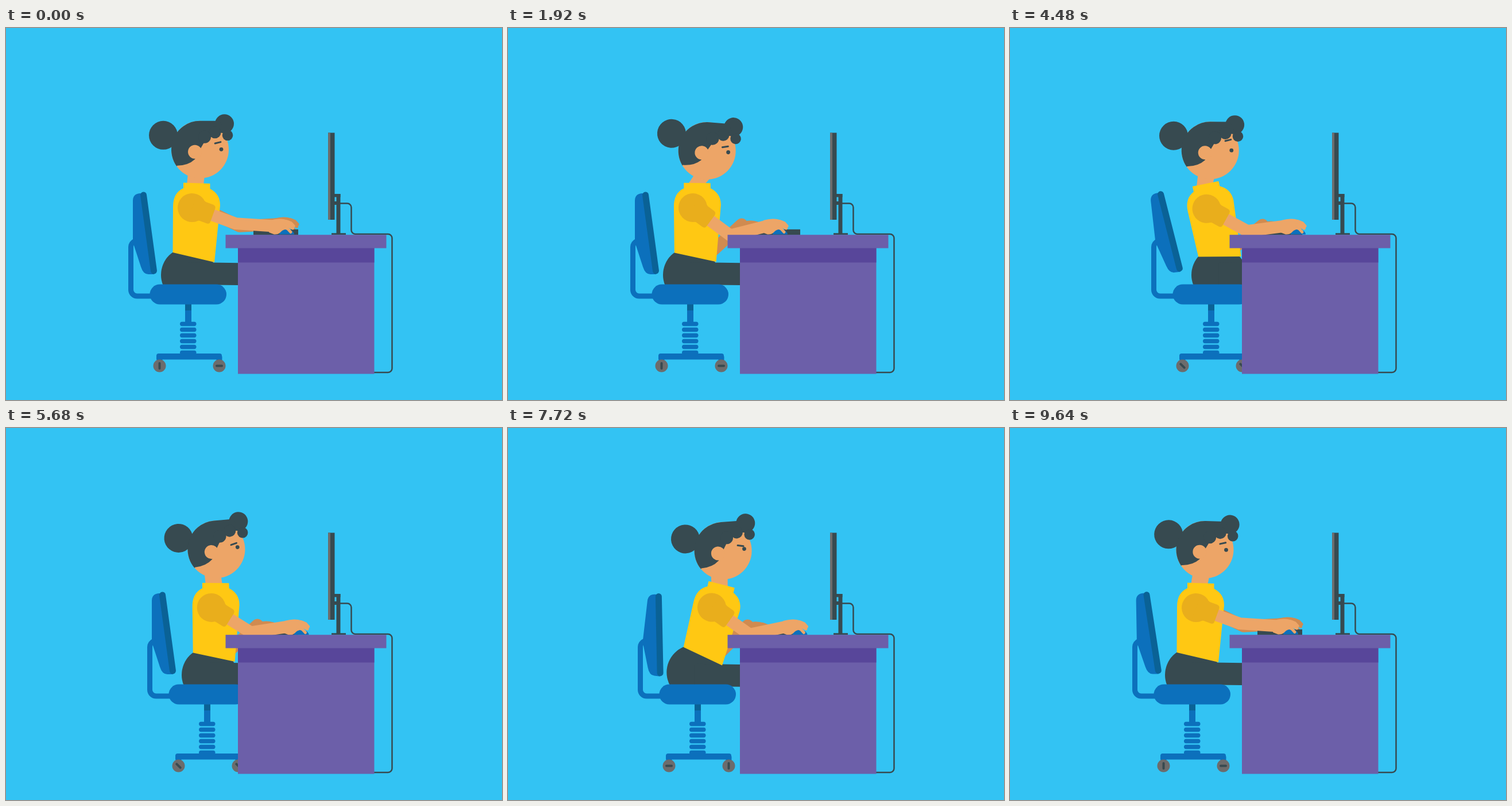
An HTML page with a canvas that plays this animation: 864x648 px, repeating every 9680 ms.

```html
<!DOCTYPE html>
<html lang="en">
<head>
<meta charset="utf-8">
<title>At the desk</title>
<style>
html, body { margin: 0; width: 100%; height: 100%; overflow: hidden; background: #33c3f3; }
canvas { display: block; }
</style>
</head>
<body>
<canvas id="stage" width="864" height="648"></canvas>
<script>
const ctx = document.getElementById('stage').getContext('2d');
const LOOP = 9680;
const RAD = Math.PI / 180;
const C = {
  sky: '#33c3f3', dark: '#374a50', grey: '#6c6c6c', skin: '#eda567', farSkin: '#d08b50',
  shirt: '#ffc813', sleeve: '#e9ae1c', blue: '#0c70bc', navy: '#0a6296',
  desk: '#6c5fa9', drawer: '#58469a'
};

// Poses: each one names only what differs from the pose it grows out of.
const reach = {
  chair: 0, spin: 0, recline: 0, hip: [318, 430], lean: 0,
  neck: 6, tilt: 0, bounce: 0, brow: [-12, -14],
  hand: [466, 345], farHand: [473, 342]
};
const type = { ...reach, lean: -1, neck: 17.5, tilt: 4.7, brow: [-9.6, -13],
  hand: [451, 345], farHand: [411, 348] };
const slump = { ...type, recline: -12.5, lean: -25, neck: 14.5, hand: [414, 345], farHand: [404, 352] };
const scoot = { ...slump, chair: 33, spin: 45, recline: -6.5, hip: [364, 430], lean: -13.5,
  neck: 8.5, tilt: 0.5, brow: [-18, -14], hand: [479, 345], farHand: [444, 349] };
const focus = { ...scoot, recline: 0, hip: [354, 430], lean: -0.7, neck: 1, tilt: -5,
  brow: [-6.6, -15], hand: [491, 346], farHand: [442, 349] };
const rollBack = { ...focus, chair: 13, spin: 90, hip: [334, 430],
  hand: [474, 346], farHand: [424, 349] };
const glare = { ...rollBack, recline: 7.5, hip: [323, 425], lean: 14, neck: 3, tilt: -4,
  brow: [-6.3, 15], hand: [487, 346], farHand: [421, 350] };
const raise = { ...glare, bounce: 3, hand: [486, 274] };
const slam = { ...glare, neck: 9, tilt: 1, hand: [490, 346] };
const settle = { ...reach, recline: -1, neck: 7.5, tilt: 1.5 };

// When each pose is reached; the same pose twice is a hold.
const timeline = [
  [0, reach], [1.2, reach], [1.92, type], [2.15, type], [2.85, slump], [4.14, slump],
  [4.48, scoot], [4.9, focus], [6.8, focus], [7.08, rollBack], [7.9, glare], [8.08, glare],
  [8.36, raise], [8.54, raise], [8.66, slam], [9.05, slam], [9.45, settle], [9.64, settle],
  [9.68, reach]
];
const SLAM_TIME = 8.65;

const clamp = v => Math.max(0, Math.min(1, v));
const ease = p => p * p * (3 - 2 * p);
const add = (a, b) => [a[0] + b[0], a[1] + b[1]];
const mix = (a, b, p) => Array.isArray(a) ? a.map((v, i) => mix(v, b[i], p)) : a + (b - a) * p;

function poseAt(t) {
  const next = Math.max(1, timeline.findIndex(([time]) => time > t));
  const [t0, from] = timeline[next - 1], [t1, to] = timeline[next];
  const p = (t - t0) / (t1 - t0);
  const pose = {};
  for (const key in from) pose[key] = mix(from[key], to[key], ease(p));
  // Long holds keep breathing a little
  if (from === to && t1 - t0 > 0.9) {
    const sway = Math.sin(2 * Math.PI * p) ** 2;
    pose.neck += 2 * sway;
    pose.lean -= 1.5 * sway;
    pose.hand = add(pose.hand, [2 * sway, 0]);
  }
  return pose;
}

function rotate([x, y], deg) {
  const c = Math.cos(deg * RAD), s = Math.sin(deg * RAD);
  return [x * c - y * s, x * s + y * c];
}

function rect(color, x, y, w, h, r = 0) {
  ctx.fillStyle = color;
  ctx.beginPath();
  ctx.roundRect(x, y, w, h, r);
  ctx.fill();
}
function disc(color, x, y, r) {
  ctx.fillStyle = color;
  ctx.beginPath();
  ctx.arc(x, y, r, 0, 7);
  ctx.fill();
}
function poly(color, points) {
  ctx.fillStyle = color;
  ctx.beginPath();
  points.forEach(p => ctx.lineTo(...p));
  ctx.fill();
}
function line(color, width, points) {
  ctx.strokeStyle = color;
  ctx.lineWidth = width;
  ctx.lineCap = ctx.lineJoin = 'round';
  ctx.beginPath();
  points.forEach(p => ctx.lineTo(...p));
  ctx.stroke();
}
// Polyline with rounded corners
function pipe(color, width, points, r) {
  ctx.strokeStyle = color;
  ctx.lineWidth = width;
  ctx.lineCap = 'butt';
  ctx.beginPath();
  ctx.moveTo(...points[0]);
  for (let i = 1; i < points.length - 1; i++) ctx.arcTo(...points[i], ...points[i + 1], r);
  ctx.lineTo(...points[points.length - 1]);
  ctx.stroke();
}
function shape(color, d) {
  ctx.fillStyle = color;
  ctx.fill(new Path2D(d));
}
function at([x, y], deg, draw) {
  ctx.save();
  ctx.translate(x, y);
  ctx.rotate(deg * RAD);
  draw();
  ctx.restore();
}

function chairBack(x, recline) {
  at([x + 223, 378], recline, () => {
    ctx.translate(-223, -378);
    shape(C.blue, 'M240 288H233Q221 289 221 301V373L235 416Q239 429 248 429H258Z');
    line(C.navy, 11, [[239.5, 291], [257.5, 423]]);
  });
  pipe(C.blue, 9, [[x + 228, 370], [x + 217.5, 374], [x + 217.5, 467], [x + 260, 467]], 11);
}

function chairBase(x, spin) {
  at([x, 0], 0, () => {
    rect(C.blue, 312, 490, 11, 24);
    rect(C.navy, 312, 480, 11, 12);
    for (let i = 0; i < 6; i++) rect(C.blue, 303, 511.8 + i * 10, 28.5, 7.4, 3.7);
    rect(C.blue, 262, 567, 114, 10.5, [4, 4, 0, 0]);
    [[267.5, 90 - spin], [371.5, spin]].forEach(([wheelX, deg]) => {
      rect(C.blue, wheelX - 5, 572, 10, 10);
      at([wheelX, 588.5], deg, () => {
        disc(C.grey, 0, 0, 11);
        line(C.dark, 4, [[-4.5, 0], [4.5, 0]]);
      });
    });
    rect(C.blue, 250.5, 446.5, 133.5, 35, 17.5);
  });
}

// Two-bone arm: finds the elbow and the wrist for a given hand
function solveArm(shoulder, hand) {
  const upper = 81, fore = 66;
  const reachLength = Math.hypot(hand[0] - shoulder[0], hand[1] - shoulder[1]);
  const bend = Math.max(clamp((130 - reachLength) / 20), clamp((345 - hand[1]) / 72));
  const wrist = add(hand, [-4 * bend, -6 * bend]);
  const dx = wrist[0] - shoulder[0], dy = wrist[1] - shoulder[1];
  const d = Math.min(Math.hypot(dx, dy), upper + fore - 0.1);
  const inner = Math.acos((upper * upper + d * d - fore * fore) / (2 * upper * d));
  const angle = (Math.atan2(dy, dx) + inner) / RAD;
  return { elbow: add(shoulder, rotate([upper, 0], angle)), wrist, angle };
}

function drawArm(color, shoulder, hand) {
  const arm = solveArm(shoulder, hand);
  line(color, 21, [shoulder, arm.elbow, arm.wrist]);
  at(hand, 0, () => {
    shape(color, 'M-6 -10Q4 -13 12 -12.5Q24 -12 31 -7L34 -3L27 3L20 6Q15 7 12 11Q8 15 1 14.5L-8 11Z');
    line(color, 6, [[22, -8], [30, -5], [34.5, 0]]);
    line(color, 5, [[20, -2], [28, 1], [33.5, 4]]);
    line(color, 5, [[17, 2], [25, 5], [30, 10.5]]);
  });
  return arm;
}

function drawSleeve(shoulder, angle) {
  at(shoulder, angle, () => {
    disc(C.sleeve, 0, 0, 25);
    shape(C.sleeve, 'M0 -25Q12 -19 20 -17.5H33Q38.5 -17 38.5 -12V12Q38.5 17 33 17H20Q12 18 0 25Z');
  });
}

function drawMouse(hand) {
  ctx.fillStyle = C.blue;
  ctx.beginPath();
  ctx.ellipse(hand[0] + 23, hand[1] + 14.5, 13, 9, 0, Math.PI, 2 * Math.PI);
  ctx.fill();
}

function drawHead(center, { tilt, bounce, brow }) {
  at(center, tilt, () => {
    disc(C.skin, 0, 0, 50);
    disc(C.dark, ...rotate([-64, -25], bounce), 25);
    disc(C.dark, ...rotate([42.5, -45], -2 * bounce), 16.5);
    disc(C.dark, 48, -25, 9.3);
    ctx.fillStyle = C.dark;
    ctx.beginPath();
    ctx.arc(0, 0, 50, 144.3 * RAD, 270 * RAD);
    [[34, -50], [44, -30], [26, -28], [8, -14], [1, -2], [-9, 17]].forEach(p => ctx.lineTo(...p));
    ctx.quadraticCurveTo(-21, 28, -40, 28);
    ctx.fill();
    disc(C.dark, 26, -30, 10.5);
    disc(C.dark, 8, -22, 11);
    disc(C.skin, -9, 4, 12);
    disc(C.dark, 37, -0.5, 3.4);
    at([31, brow[0]], brow[1], () => line(C.dark, 3, [[-5, 0], [5, 0]]));
  });
}

function drawDesk() {
  rect(C.desk, 404, 383, 237.5, 219.5);
  rect(C.drawer, 404, 383, 237.5, 25.5);
  rect(C.desk, 382.5, 360.3, 280, 23.2);
}

function drawScreen(jump) {
  at([0, jump], 0, () => {
    rect(C.dark, 575.5, 289, 7, 70);
    rect(C.dark, 571, 289, 11.5, 5.5);
    rect(C.dark, 571, 302, 5, 6);
    rect(C.dark, 567, 357.3, 25, 3);
    rect(C.dark, 561, 182.5, 11.5, 151.5);
    rect(C.grey, 561, 182.5, 4, 151.5);
  });
  pipe(C.dark, 2.5, [[580, 305.5 + jump], [601.5, 305.5 + jump], [601.5, 359 + jump],
    [672.5, 359 + jump], [672.5, 600], [641, 600]], 7);
}

function render(t) {
  const pose = poseAt(t);
  const { chair, hip, lean, neck, hand, farHand } = pose;
  const onTorso = p => add(hip, rotate(p, lean));
  const shoulder = onTorso([6, -117]);
  const head = add(onTorso([14, -160]), [neck, -Math.sqrt(58.5 ** 2 - neck ** 2)]);
  const thighY = 408 + (430 - hip[1]) * 0.6;
  const sinceSlam = Math.max(0, t - SLAM_TIME);
  const jump = -6 * Math.exp(-9 * sinceSlam) * Math.abs(Math.sin(18 * sinceSlam));

  ctx.fillStyle = C.sky;
  ctx.fillRect(0, 0, 864, 648);

  chairBack(chair, pose.recline);
  drawArm(C.farSkin, add(shoulder, [10, -3]), farHand);
  disc(C.dark, ...hip, 48);
  poly(C.dark, [[hip[0], thighY], [406, thighY + 1.3], [406, thighY + 40], [hip[0], thighY + 39]]);
  poly(C.skin, [add(head, [-21, 40]), add(head, [8, 45]), onTorso([26, -156]), onTorso([-3, -156])]);
  at(hip, lean, () => shape(C.shirt,
    'M-27.5 -39L-27 -119Q-27 -143 -9 -151V-160.5L37.5 -159V-150Q55 -141 55 -121L45 -22Z'));

  drawScreen(jump);
  rect(C.dark, 431, 350.8 + jump, 78, 10);
  drawMouse(hand);
  const arm = drawArm(C.skin, shoulder, hand);
  drawSleeve(shoulder, arm.angle);
  drawHead(head, pose);
  chairBase(chair, pose.spin);
  drawDesk();
}

const start = performance.now();
function frame() {
  render(((performance.now() - start) % LOOP) / 1000);
  requestAnimationFrame(frame);
}
frame();
</script>
</body>
</html>
```
